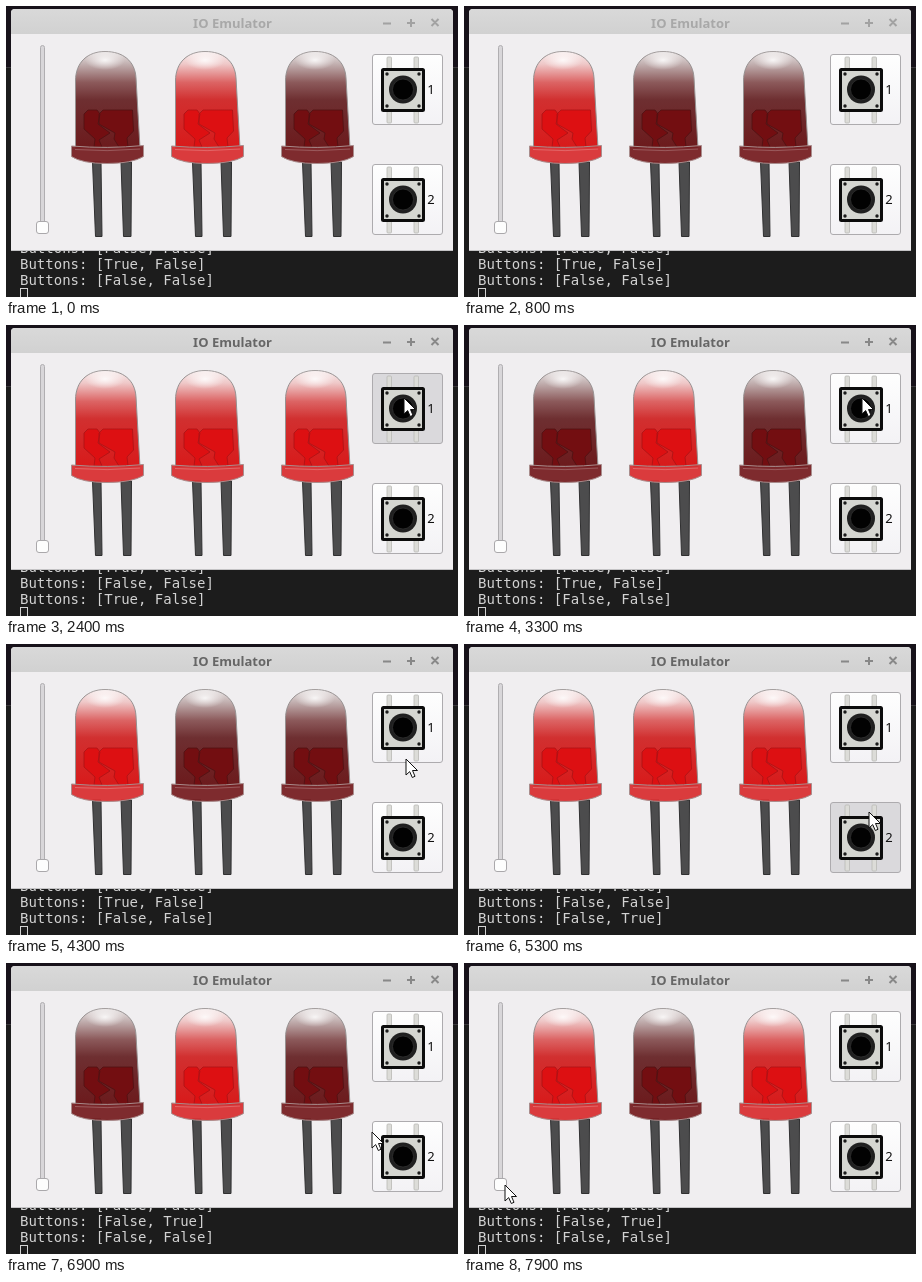
These frames come from a looping animation (452 by 291 pixels, 8 s). An HTML page:

```html
<!DOCTYPE html>
<html lang="en">
<head>
<meta charset="utf-8">
<title>IO Emulator</title>
<style>
  html, body { margin: 0; width: 100%; height: 100%; overflow: hidden; background: #1c1c1c; }
  svg { display: block; width: 452px; height: 291px; }
  text { white-space: pre; }
  .ui { font-family: "Noto Sans", "Open Sans", sans-serif; font-size: 13px; }
  .mono { font: 14px "DejaVu Sans Mono", monospace; fill: #d2d2d2; }
</style>
</head>
<body>
<svg viewBox="0 0 452 291">
  <defs>
    <linearGradient id="bar" x2="0" y2="1">
      <stop stop-color="#d9d9d9"/><stop offset="1" stop-color="#d1d1d1"/>
    </linearGradient>
    <linearGradient id="face" x2="0" y2="1">
      <stop stop-color="#fefefe"/><stop offset="1" stop-color="#f3f2f5"/>
    </linearGradient>
    <linearGradient id="lit" x2="0" y2="1">
      <stop stop-color="#f7eeee"/><stop offset=".13" stop-color="#efc8c8"/>
      <stop offset=".32" stop-color="#dc6464"/><stop offset=".5" stop-color="#d13030"/>
      <stop offset="1" stop-color="#d81a1a"/>
    </linearGradient>
    <linearGradient id="dark" x2="0" y2="1">
      <stop stop-color="#eae6e6"/><stop offset=".13" stop-color="#c2b0b0"/>
      <stop offset=".32" stop-color="#8c5a5b"/><stop offset=".5" stop-color="#6e2f31"/>
      <stop offset="1" stop-color="#6c1a1c"/>
    </linearGradient>
    <radialGradient id="shine">
      <stop stop-color="#fff" stop-opacity=".85"/><stop offset="1" stop-color="#fff" stop-opacity="0"/>
    </radialGradient>

    <g id="legs" fill="#4c4c4d" stroke="#303031">
      <path d="M86.5 156H95L96 230.5H89.5Z"/>
      <path d="M115 156H125.500L125 230.500H117.500Z"/>
    </g>
    <path id="dome" d="M69.500 142V75C69.500 56 82 45.500 99 45.500C117 45.500 129 55 130 72L134 142Z"/>
    <path id="chip" d="M78 108L82 104H91L94 108L92 118L104 127L93 134L96 141H88L89 133L78 123ZM97 104H126.500L127.500 125L121 132L122 141H113L108 133L109 127L93 118V108Z"/>
    <path id="flange" d="M65.500 140Q101 143 137.500 139.500V150.500Q126 157.500 101 157.500Q76 157.500 65.500 150.500Z"/>

    <g id="switch">
      <g fill="#dcdcd8" stroke="#b9b9b5" stroke-width=".8">
        <rect x="381" y="51" width="4.500" height="66" rx="1"/>
        <rect x="408" y="51" width="4.500" height="66" rx="1"/>
      </g>
      <rect x="376.500" y="63.500" width="41" height="41" rx="1" fill="#d5d6d1" stroke="#0c0c0c" stroke-width="3"/>
      <g fill="#1a1a1a">
        <circle cx="381" cy="68" r="1.700"/><circle cx="413" cy="68" r="1.700"/>
        <circle cx="381" cy="100" r="1.700"/><circle cx="413" cy="100" r="1.700"/>
      </g>
      <circle cx="397" cy="83.500" r="14" fill="#202020"/>
      <circle cx="397" cy="83.500" r="10.500" fill="#020202" stroke="#343434" stroke-width=".7"/>
    </g>
  </defs>

  <rect width="452" height="291" fill="#1c1c1c"/>
  <rect width="452" height="61" fill="#17121a"/>
  <path d="M0 61.500H452" stroke="#3a383b"/>
  <g id="log" class="mono"></g>
  <rect x="14.500" y="282.500" width="7" height="14" fill="none" stroke="#d2d2d2"/>

  <path d="M5 245V7Q5 3 9 3H443Q447 3 447 7V245Z" fill="#f0eef0"/>
  <path d="M5 28V7Q5 3 9 3H443Q447 3 447 7V28Z" fill="url(#bar)"/>
  <path d="M5 244.500H447" stroke="#c4c3c5"/>
  <text id="title" class="ui" x="226.500" y="22" text-anchor="middle" font-weight="700">IO Emulator</text>
  <path id="controls" d="M377 17.500H385M401 17H409M405 13V21M425.500 13L432.500 20M432.500 13L425.500 20" fill="none" stroke-width="2"/>

  <rect x="34.500" y="39.500" width="4" height="186" rx="2" fill="#d8d6d9" stroke="#b0aeb1"/>
  <rect x="30.500" y="215.500" width="12" height="12" rx="2.500" fill="#fdfdfd" stroke="#aaa8ab"/>

  <g id="leds"></g>
  <g id="buttons"></g>
  <path id="pointer" d="M0 0V16L3.700 12.600L6.300 18.500L9 17.300L6.500 11.500H11.500Z" fill="#fff" stroke="#111" stroke-linejoin="round"/>
</svg>
<script>
const LOOP = 8000, STEP = 100;
const $ = id => document.getElementById(id);

// Times (in steps) at which the three-bit counter advances
const ticks = [4, 8, 13, 17, 21, 25, 29, 33, 37, 41, 45, 49, 53, 58, 62, 66, 70, 75, 79];
const FIRST_COUNT = 2, FOCUS = 24;

// Button state after each press or release: [step, pressed button or 0]
const clicks = [[-3, 0], [-2, 1], [-1, 0], [24, 1], [30, 0], [35, 1], [39, 0],
                [51, 2], [56, 0], [64, 2], [67, 0]];

// Pointer path: [step, x, y]
const path = [[14, 386, 16], [16, 392, 48], [19, 398, 73], [40, 398, 73], [43, 400, 115],
              [47, 405, 168], [67, 405, 168], [69, 366, 169], [74, 68, 214],
              [77, 43, 221], [79, 41, 222]];

const ledParts = [0, 100, 210].map(dx => {
  const g = document.createElementNS("http://www.w3.org/2000/svg", "g");
  g.setAttribute("transform", `translate(${dx} 0)`);
  g.innerHTML = `<use href="#legs"/>
    <use href="#dome" stroke="#969090"/>
    <use href="#chip" stroke-width=".8"/>
    <ellipse cx="99" cy="54" rx="20" ry="10" fill="url(#shine)"/>
    <use href="#flange" stroke="#a98d8d" fill-opacity=".92"/>
    <path d="M69 143.500Q101 146 134 143" fill="none" stroke="#fff" stroke-opacity=".22"/>`;
  $("leds").append(g);
  return g.querySelectorAll("use");
});

const faces = [1, 2].map(n => {
  const g = document.createElementNS("http://www.w3.org/2000/svg", "g");
  g.setAttribute("transform", `translate(0 ${(n - 1) * 110})`);
  g.innerHTML = `<rect x="366.500" y="48.500" width="70" height="70" rx="2.500" stroke="#adabae"/>
    <use href="#switch"/>
    <text class="ui" x="425" y="88" text-anchor="middle" fill="#111">${n}</text>`;
  $("buttons").append(g);
  return g.querySelector("rect");
});

const lines = [247, 263, 279].map(y => {
  const line = document.createElementNS("http://www.w3.org/2000/svg", "text");
  line.setAttribute("x", 14);
  line.setAttribute("y", y);
  $("log").append(line);
  return line;
});

function paintLed([, dome, chip, flange], on) {
  dome.setAttribute("fill", on ? "url(#lit)" : "url(#dark)");
  chip.setAttribute("fill", on ? "#dd1012" : "#730e11");
  chip.setAttribute("stroke", on ? "#aa1416" : "#4e1214");
  flange.setAttribute("fill", on ? "#d82c2e" : "#751b1e");
}

function pointerAt(s) {
  const i = path.findIndex(p => p[0] > s);
  if (i < 0) return path[path.length - 1].slice(1);
  const [s0, x0, y0] = path[i - 1], [s1, x1, y1] = path[i];
  const k = (s - s0) / (s1 - s0);
  return [x0 + (x1 - x0) * k, y0 + (y1 - y0) * k].map(Math.round);
}

function render(time) {
  const s = Math.floor(time % LOOP / STEP);

  const count = FIRST_COUNT + ticks.filter(t => t <= s).length;
  ledParts.forEach((led, i) => paintLed(led, count >> (2 - i) & 1));

  const past = clicks.filter(c => c[0] <= s).slice(-3);
  const bool = v => v ? "True" : "False";
  past.forEach(([, b], i) => {
    lines[i].textContent = `Buttons: [${bool(b === 1)}, ${bool(b === 2)}]`;
  });
  const held = past[2][1];
  faces.forEach((f, i) => f.setAttribute("fill", held === i + 1 ? "#dad9dc" : "url(#face)"));

  const focused = s >= FOCUS;
  $("title").setAttribute("fill", focused ? "#666" : "#a8a8a8");
  $("controls").setAttribute("stroke", focused ? "#888" : "#a2a2a2");

  const shown = s >= path[0][0];
  $("pointer").setAttribute("visibility", shown ? "visible" : "hidden");
  if (shown) $("pointer").setAttribute("transform", `translate(${pointerAt(s).join(" ")})`);
}

const start = performance.now();
function frame() {
  render(performance.now() - start);
  requestAnimationFrame(frame);
}
frame();
</script>
</body>
</html>
```
